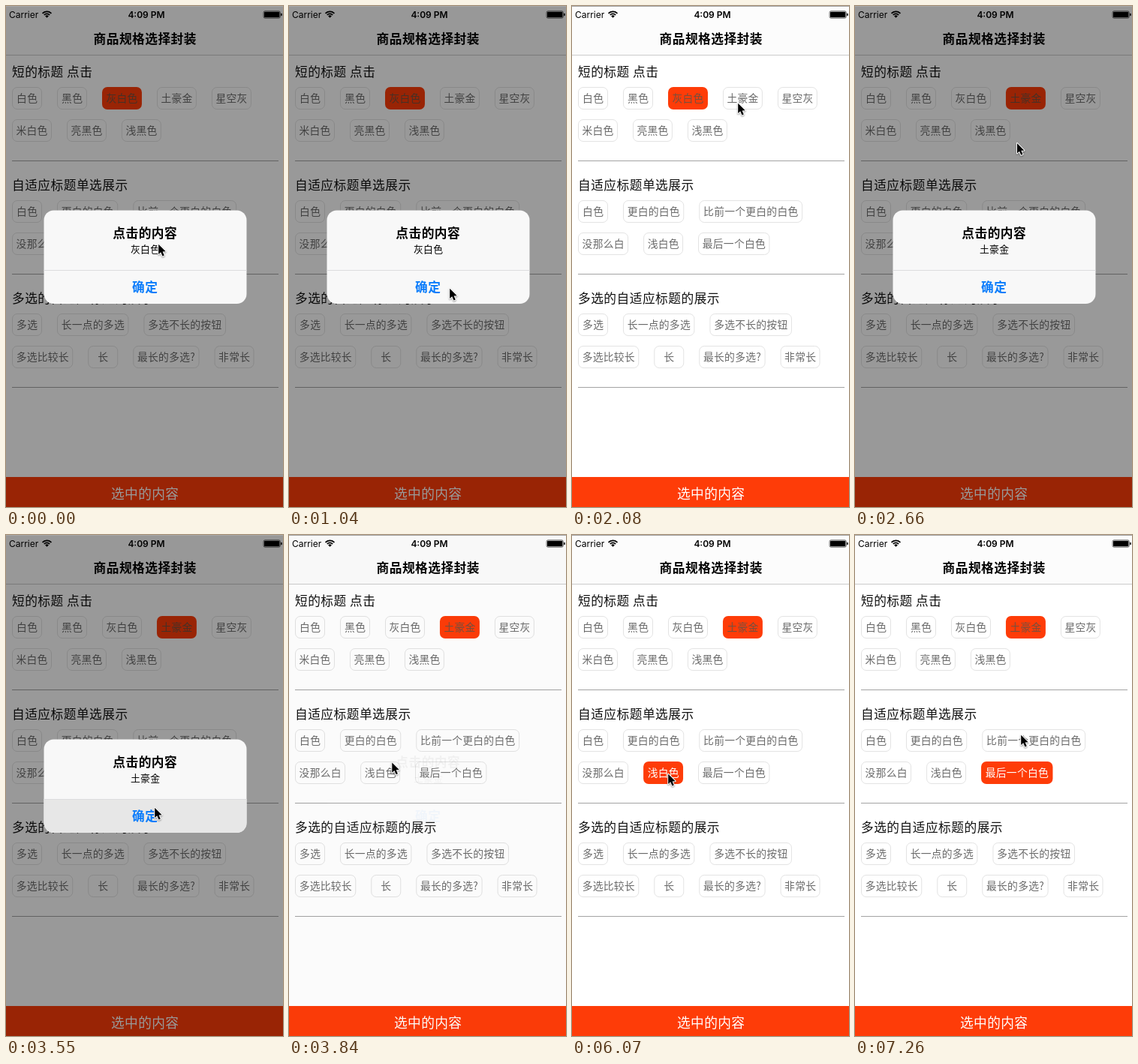
Recreate the animation shown at these times as an HTML page with a canvas. Size 369 by 668 pixels, loop 8 s.

```html
<!DOCTYPE html>
<html lang="zh">
<head>
<meta charset="utf-8">
<title>商品规格选择</title>
<style>
  html, body { margin: 0; width: 100%; height: 100%; overflow: hidden; background: #fff; }
  canvas { display: block; width: 369px; height: 668px; }
</style>
</head>
<body>
<canvas id="stage"></canvas>
<script>
const W = 369, H = 668, LOOP = 8000;
const TICK = 147.6; // motion is sampled at this interval
const RED = '#fe3c08';
const CJK = '"Noto Sans CJK SC", "Noto Sans CJK", sans-serif';
const LATIN = 'Inter, Roboto, sans-serif';

const canvas = document.getElementById('stage');
const ctx = canvas.getContext('2d');
const dpr = window.devicePixelRatio || 1;
canvas.width = W * dpr;
canvas.height = H * dpr;

// Each pick is a time and the label selected from then on
const sections = [
  { title: '短的标题 点击', ink: '#74503f',
    rows: ['白色 黑色 灰白色 土豪金 星空灰', '米白色 亮黑色 浅黑色'],
    picks: [[0, '灰白色'], [2200, '土豪金']] },
  { title: '自适应标题单选展示', ink: '#fff',
    rows: ['白色 更白的白色 比前一个更白的白色', '没那么白 浅白色 最后一个白色'],
    picks: [[0, ''], [4250, '更白的白色'], [5150, '比前一个更白的白色'],
      [6040, '浅白色'], [6900, '最后一个白色']] },
  { title: '多选的自适应标题的展示', ink: '#fff',
    rows: ['多选 长一点的多选 多选不长的按钮', '多选比较长 长 最长的多选? 非常长'],
    picks: [[0, '']] }
];

// Pointer moves: when each starts and ends, and where it leads
const home = { x: 202, y: 316 };
const moves = [
  { from: 0, to: 440, x: 213, y: 375 },
  { from: 1250, to: 2050, x: 220, y: 128 },
  { from: 2400, to: 3230, x: 197, y: 362 },
  { from: 3630, to: 3950, x: 112, y: 278 },
  { from: 4450, to: 4990, x: 214, y: 276 },
  { from: 5350, to: 5750, x: 127, y: 317 },
  { from: 6080, to: 6400, x: 79, y: 332 },
  { from: 6400, to: 6880, x: 206, y: 303 },
  { from: 6950, to: 7220, x: 220, y: 265 }
];

const clamp = v => Math.min(1, Math.max(0, v));
const smooth = p => p * p * (3 - 2 * p);
const easeOut = p => 1 - (1 - p) ** 2;
const pickAt = (s, t) => s.picks.filter(p => p[0] <= t).pop()[1];

function pointerAt(t) {
  let { x, y } = home;
  for (const m of moves) {
    const f = smooth(clamp((t - m.from) / (m.to - m.from)));
    x += (m.x - x) * f;
    y += (m.y - y) * f;
  }
  return [x, y];
}

// Text placed by its vertical middle
function text(str, x, cy, size, o = {}) {
  const gap = o.gap || 0, align = o.align || 'center';
  ctx.font = `${o.weight || 400} ${size}px ${o.font || CJK}`;
  ctx.letterSpacing = gap + 'px';
  ctx.textAlign = align;
  ctx.fillStyle = o.color || '#000';
  ctx.fillText(str, x + (align === 'center' ? gap / 2 : 0), cy + size * 0.38);
}

function rect(x, y, w, h, color) {
  ctx.fillStyle = color;
  ctx.fillRect(x, y, w, h);
}

function fillRound(x, y, w, h, r, color) {
  ctx.beginPath();
  ctx.roundRect(x, y, w, h, r);
  ctx.fillStyle = color;
  ctx.fill();
}

function strokeRound(x, y, w, h, r, color, line) {
  ctx.beginPath();
  ctx.roundRect(x + line / 2, y + line / 2, w - line, h - line, r);
  ctx.strokeStyle = color;
  ctx.lineWidth = line;
  ctx.stroke();
}

function statusBar() {
  text('Carrier', 4, 11.3, 12, { font: LATIN, align: 'left' });
  text('4:09 PM', 187, 11.3, 12, { font: LATIN, weight: 600 });
  ctx.strokeStyle = ctx.fillStyle = '#000';
  ctx.lineWidth = 1.7;
  for (const r of [8.2, 5.1]) {
    ctx.beginPath();
    ctx.arc(54.5, 15.5, r, -Math.PI * 0.76, -Math.PI * 0.24);
    ctx.stroke();
  }
  ctx.beginPath();
  ctx.moveTo(54.5, 15.7);
  ctx.arc(54.5, 15.7, 3.2, -Math.PI * 0.76, -Math.PI * 0.24);
  ctx.fill();
  strokeRound(342.8, 6.5, 22.8, 10, 2, '#000', 0.6);
  fillRound(344, 7.7, 20.4, 7.6, 1, '#000');
  fillRound(366.2, 9.7, 1.5, 3.6, 0.7, '#000');
}

function chip(label, x, y, w, active, ink) {
  if (active) fillRound(x, y, w, 30, 7, RED);
  else strokeRound(x, y, w, 30, 6.5, '#e3e3e3', 1);
  text(label, x + w / 2, y + 14.6, 13.8, { gap: 0.25, color: active ? ink : '#6a6a6a' });
}

function section(s, y, t) {
  const selected = pickAt(s, t);
  text(s.title, 8, y, 16.7, { gap: 0.5, align: 'left', color: '#111' });
  s.rows.forEach((row, i) => {
    let x = 8;
    for (const label of row.split(' ')) {
      const count = label.length - (label.endsWith('?') ? 0.5 : 0);
      const w = Math.max(40, 14.15 * count + 10.5);
      chip(label, x, y + 20 + i * 43, w, label === selected, s.ink);
      x += w + 20;
    }
  });
  rect(8, y + 118, 355, 1, '#a3a3a3');
}

function page(t) {
  rect(0, 0, W, H, '#fff');
  rect(0, 0, W, 65, '#fcfcfc');
  rect(0, 65, W, 1, '#cbcbcb');
  statusBar();
  text('商品规格选择封装', 185, 43.5, 16.7, { gap: 0.5, weight: 600 });
  sections.forEach((s, i) => section(s, 88 + 151 * i, t));
  rect(0, 628, W, 40, RED);
  text('选中的内容', 185, 650, 17.7, { gap: 0.4, color: '#fff' });
}

function alertState(t) {
  const fade = start => 1 - easeOut(clamp((t - start) / 350));
  if (t < 2200) return { alpha: fade(1050), scale: 1, pressed: t > 880 && t < 1030 };
  const rise = easeOut(clamp((t - 2200) / 400));
  return { alpha: rise * fade(3560), scale: 1.2 - 0.2 * rise, pressed: t > 3240 && t < 3600 };
}

function alertBox(t) {
  const { alpha, scale, pressed } = alertState(t);
  if (alpha <= 0) return;
  ctx.save();
  ctx.globalAlpha = alpha;
  rect(0, 0, W, H, 'rgba(0,0,0,0.4)');
  ctx.translate(185.5, 335);
  ctx.scale(scale, scale);
  ctx.translate(-185.5, -335);
  fillRound(50.5, 272.5, 270, 124.5, 13, '#f8f8f8');
  if (pressed) fillRound(50.5, 352, 270, 45, [0, 0, 13, 13], '#e7e7e7');
  rect(50.5, 352, 270, 1, '#dcdcde');
  text('点击的内容', 185, 303, 16.7, { gap: 0.5, weight: 600 });
  text(pickAt(sections[0], t), 185.5, 324.3, 12.8, { gap: 0.3 });
  text('确定', 185, 375, 16.7, { gap: 0.5, weight: 600, color: '#087bfb' });
  ctx.restore();
}

function pointer(x, y) {
  ctx.save();
  ctx.translate(x + 1.2, y + 1.7);
  ctx.beginPath();
  [[0, 0], [0, 13.4], [3, 10.6], [5.3, 15.8], [7.6, 14.8], [5.4, 9.8], [9.5, 9.6]]
    .forEach(p => ctx.lineTo(...p));
  ctx.closePath();
  ctx.lineJoin = 'round';
  ctx.lineWidth = 2;
  ctx.strokeStyle = '#fff';
  ctx.shadowColor = 'rgba(0,0,0,0.4)';
  ctx.shadowBlur = 2 * dpr;
  ctx.shadowOffsetY = dpr;
  ctx.stroke();
  ctx.shadowColor = 'transparent';
  ctx.fillStyle = '#000';
  ctx.fill();
  ctx.restore();
}

function draw(now) {
  const t = Math.floor((now % LOOP) / TICK) * TICK;
  ctx.setTransform(dpr, 0, 0, dpr, 0, 0);
  page(t);
  alertBox(t);
  rect(0, 0, W, 1, '#a6a6a6');
  pointer(...pointerAt(t));
}

const start = performance.now();
function loop() {
  draw(performance.now() - start);
  requestAnimationFrame(loop);
}
loop();
</script>
</body>
</html>
```
